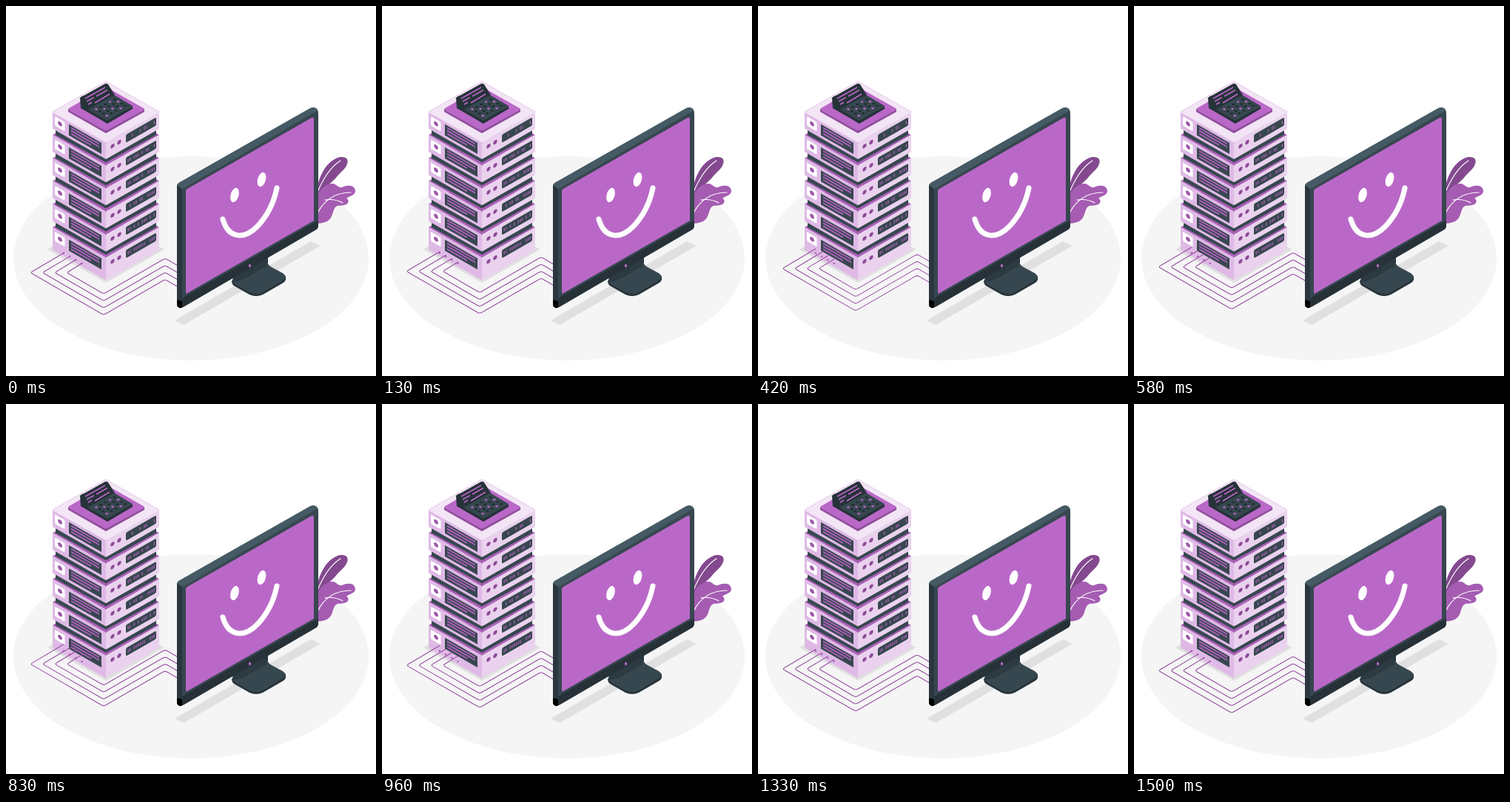
Animation of 500x500 px, one loop 1540 ms. Source, as an HTML page:

```html
<!DOCTYPE html>
<html lang="en">
<head>
<meta charset="utf-8">
<title>Server and monitor</title>
<style>
html, body { margin: 0; width: 100%; height: 100%; overflow: hidden; background: #fff; }
svg { display: block; width: 100vw; height: 100vh; }
</style>
</head>
<body>
<svg viewBox="0 0 500 500" fill="none" stroke-linecap="round" stroke-linejoin="round">
  <ellipse cx="250" cy="341" rx="240" ry="138" fill="#f5f5f5"/>
  <g fill="#e0e0e0">
    <path d="M56 329 135 284 214 329 135 374Z"/>
    <path d="M228 425 412 318 425 324 240 431Z"/>
  </g>

  <g id="plant">
    <path fill="#84498f" d="M418 262C420 234 431 212 447 205.500C456 202 463 205 461.500 212C459 221 451 225 446 232C438 241 428 246 418 262Z"/>
    <path fill="#a55cb2" d="M418 262C424 246 434 239 442 240C447 241 449 246 454 245C461 242 471 241 472 250C472 256 465 256 460 260C463 261 464 266 460 268C454 271 449 268 445 272C440 278 443 290 428 293Q424 294 418 294Z"/>
    <path stroke="#fff" stroke-width="1.1" d="M420 254Q433 221 452 209M420 282Q434 252 466 252M431 262Q444 260 455 266"/>
  </g>

  <g id="tower"></g>

  <g id="calculator">
    <path fill="#8f4f9b" d="M84 139 135 168 187 139V143L135 172 84 143Z"/>
    <path fill="#ba68c8" d="M87 137 132 111Q135 109 138 111L184 137Q189 139 184 142L138 167Q135 169 132 167L87 142Q82 139 87 137Z"/>
    <path fill="#263238" d="M100 124 104 121 112 140 137 154 171 135V139L137 159 101 138Z"/>
    <path fill="#37474f" d="M109 139 146 120 171 135 137 155Z"/>
    <path fill="#263238" d="M100 124 134 105Q136 104 138 106L147 120 110 140Z"/>
    <path stroke="#ba68c8" stroke-width="1.5" stroke-linecap="butt" d="M107 125 134 110M109 129 119 123.500M122 122 137 113.500M111 133 116 130M120 131 140 119"/>
    <g id="keys"></g>
  </g>

  <g id="dots" fill="#8d4a98"></g>
  <g id="cables" stroke="#984fa3" stroke-width="1.1"></g>

  <g id="monitor">
    <path fill="#263238" d="M305 371 378 365V370Q377 373 373 375L347 390Q338 394 329 390L308 378Q305 376 305 371Z"/>
    <path fill="#37474f" d="M307 369 352 345Q354 350 359 353L374 361Q381 366 374 371L347 387Q338 391.500 329 387L308 375Q304 371 307 369Z"/>
    <path fill="#2c3a42" d="M306 366 354 338V347Q353 352 346 355L322 369Q315 372 307 373Z"/>
    <path fill="#455a64" d="M231 243Q231 240 235 238L411 138Q415 136 419 138 422 140 422 144L237 249Z"/>
    <path fill="#37474f" d="M237 248 418 143Q422 141 422 145V296Q422 300 418 302L237 408Z"/>
    <path fill="#263238" d="M237 395.500 422 289.500V297Q422 301 418 303L241 406Q236 409 233 407Z"/>
    <path fill="#2a373e" d="M231 242 238 247V407Q234 409 231 405Z"/>
    <path fill="#000" d="M231 397 238 399V407Q234 410 231 405Z"/>
    <path fill="#ba68c8" d="M243 250Q243 248 245 247L413 151Q416 150 416 153V290L245 388Q243 389 243 387Z"/>
    <ellipse cx="329.500" cy="351" rx="1.600" ry="2.200" fill="#ba68c8"/>
    <g fill="#fff">
      <ellipse cx="309" cy="255.500" rx="5.400" ry="10" transform="rotate(16 309 255.500)"/>
      <ellipse cx="345.500" cy="234.500" rx="5.400" ry="10" transform="rotate(16 345.500 234.500)"/>
    </g>
    <path stroke="#fff" stroke-width="7" d="M293 288C300 313.500 321 317 340 297.500Q360 276 366 246"/>
  </g>
</svg>
<script>
const PERIOD = 1540, FLOAT_TIME = 1500, LIFT = 10, SLOPE = 0.57;
const byId = id => document.getElementById(id);
const rect = (x, y, w, h, fill, r = 0) =>
  `<rect x="${x}" y="${y}" width="${w}" height="${h}" rx="${r}" fill="${fill}"/>`;
const circle = (x, y, r, fill = '') =>
  `<circle cx="${x}" cy="${y}" r="${r}"${fill && ` fill="${fill}"`}/>`;
const shape = (d, fill) => `<path d="${d}" fill="${fill}"/>`;
const face = (slope, x, y, content) =>
  `<g transform="matrix(1 ${slope} 0 1 ${x} ${y})">${content}</g>`;

// One rack unit; y is the height of its left and right top corners.
function rackUnit(y, height, leds, isTop) {
  const slot = (dy, w) => rect(25, dy, w, 2.1, '#ad62ba');
  const left = rect(0, 0, 72, height, '#dfbae6', 1)
    + rect(3, 4.5, 13.5, 12.5, '#fff', 1.5) + circle(10, 10.5, 2.9, '#9c55a8')
    + rect(22, 4.3, 44, 15, '#37474f') + slot(6.3, 38) + slot(10.3, 38) + slot(14.3, 27);
  const lights = [...leds].map((c, i) =>
    c === '1' ? rect(29.5 + i * 2.7, 8.8, 1.5, 4, '#a35eaf') : '').join('');
  const right = rect(0, 0, 72, height, '#ead2ee', 1)
    + circle(9, 10.3, 2.7, '#8d4a98') + circle(18, 10.3, 2.7, '#8d4a98')
    + rect(27, 5.2, 41, 11, '#37474f', 2) + lights;
  const top = `M63 ${y} 135 ${y - 41} 207 ${y} 135 ${y + 41}Z`;
  const core = shape(`M67 ${y - 10}V${y}L135 ${y + 37} 203 ${y}V${y - 10}L135 ${y + 28}Z`, '#37474f');
  const rim = `<path d="M63.500 ${y + .5} 135 ${y + 41} 206.500 ${y + .5}" stroke="#f3e5f5"/>`;
  return shape(top, isTop ? '#f3e5f5' : '#a961b6') + (isTop ? '' : core)
    + face(SLOPE, 63, y, left) + face(-SLOPE, 135, y + 41, right) + (isTop ? rim : '');
}

const ledRows = ['00100010110001', '11011101011001', '11011101001111',
  '01011011001111', '11010101110101', '11011111100111'];
// Painted bottom up so that each unit covers the top of the one below.
byId('tower').innerHTML = ledRows.map((leds, i) =>
  rackUnit(143 + i * 31.2, i === 5 ? 30.5 : 23, leds, i === 0)).reverse().join('')
  + '<path d="M63 143 135 102 207 143" stroke="#dfbae6" stroke-width=".8"/>';

let keys = '';
for (let row = 0; row < 4; row++)
  for (let col = 0; col < 5; col++)
    keys += `<ellipse cx="${122 + col * 6.2 + row * 4.8}" cy="${139.5 - col * 3.3 + row * 2.9}" rx="1.900" ry="1.200" fill="${(row + col * 2) % 3 ? '#1f2a30' : '#ba68c8'}"/>`;
byId('keys').innerHTML = keys;

function roundedPath(points, radius) {
  const toward = ([ax, ay], [bx, by]) => {
    const k = radius / Math.hypot(bx - ax, by - ay);
    return [ax + (bx - ax) * k, ay + (by - ay) * k];
  };
  return points.map((p, i) => {
    if (i === 0) return `M${p}`;
    if (i === points.length - 1) return `L${p}`;
    return `L${toward(p, points[i - 1])}Q${p} ${toward(p, points[i + 1])}`;
  }).join('');
}

let cables = '', dots = '';
for (let i = 0; i < 4; i++) {
  const start = [78 + i * 8.2, 333.7 + i * 4.7], bottom = 417.5 - i * 9.5;
  const points = [start, [33 + i * 16.4, 360.3], [132, bottom], [215, bottom - 48], [240, bottom - 33.5]];
  cables += `<path d="${roundedPath(points, 3)}"/>`;
  dots += circle(...start, 1.1);
}
byId('cables').innerHTML = cables;
byId('dots').innerHTML = dots;

function draw(now) {
  const phase = Math.min(now % PERIOD / FLOAT_TIME, 1);
  const lift = LIFT * (1 - Math.abs(1 - 2 * phase));
  byId('cables').setAttribute('transform', `translate(0 ${-lift})`);
}
const begin = performance.now();
function tick() {
  draw(performance.now() - begin);
  requestAnimationFrame(tick);
}
tick();
</script>
</body>
</html>
```
